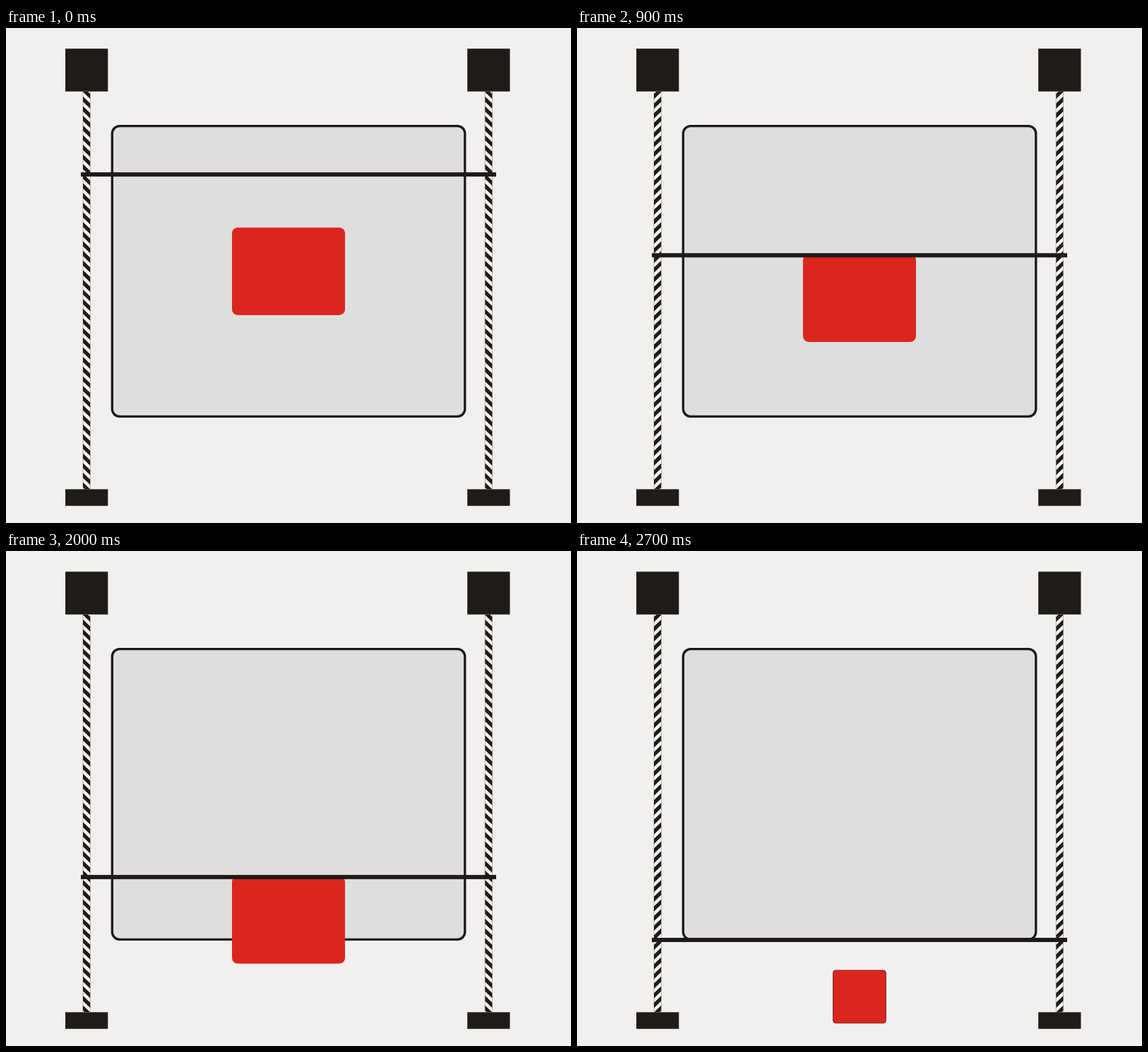
Recreate the animation shown at these times as an HTML page. Size 800 px wide and 700 px high, loop 2800 ms.

```html
<!DOCTYPE html>
<html lang="en">
<head>
<meta charset="utf-8">
<title>Pusher bar</title>
<style>
html, body { margin: 0; width: 100%; height: 100%; overflow: hidden; background: #f1f0ee; }
svg { display: block; width: 800px; height: 700px; }
</style>
</head>
<body>
<svg viewBox="0 0 800 700">
  <defs>
    <clipPath id="rod"><rect x="109" y="90" width="10.4" height="562"/></clipPath>
    <g id="screw">
      <g clip-path="url(#rod)">
        <rect x="109" y="90" width="10.4" height="562" fill="#faf9f7"/>
        <path id="thread" fill="#1f1b19"/>
      </g>
      <path d="M109.1 90V652M119.3 90V652" stroke="#1f1b19" stroke-width=".5" opacity=".6"/>
      <path d="M84 29.2h60.3v60.6H84zM84 652.2h60.3v23.6H84z" fill="#211b18"/>
    </g>
  </defs>
  <rect width="800" height="700" fill="#f1f0ee"/>
  <rect x="150.3" y="138.7" width="499.5" height="410.6" rx="10.5" fill="#dededc" stroke="#1d1919" stroke-width="3.3"/>
  <use href="#screw"/>
  <use href="#screw" x="569.2"/>
  <g fill="#db261d" stroke="#5e1712" stroke-width="0">
    <rect id="top"/>
    <rect id="back"/>
  </g>
  <rect id="bar" x="106" width="588" height="6" fill="#1f1a1a"/>
</svg>
<script>
const LOOP = 2800, STEP = 100, TIP = 2300, FALL = 2400;
const $ = id => document.getElementById(id);
const set = (el, attrs) => { for (const k in attrs) el.setAttribute(k, attrs[k]); };
const mix = (a, b, p) => a + (b - a) * p;

// Slanted bands across the rod; dir flips the slope
function thread(dir) {
  const pitch = 13.64, half = 3.7, rise = 5 * dir;
  let d = "";
  for (let y = 91.9 - pitch; y < 670; y += pitch) {
    d += `M109 ${y - rise - half}L119.4 ${y + rise - half}v${2 * half}L109 ${y - rise + half}z`;
  }
  return d;
}
const threads = [thread(1), thread(-1)];

function face(el, x, y, w, h, r, line) {
  set(el, { x, y, width: w, height: h, rx: r, "stroke-width": line });
}

function draw(time) {
  const step = Math.floor((time % LOOP) / STEP), t = step * STEP;
  const bar = 207.1 + 0.127 * t;
  set($("bar"), { y: bar - 3 });
  set($("thread"), { d: threads[step % 2] });

  if (t < TIP) {
    face($("top"), 320, Math.max(282.2, bar - 1.2), 160, 123.7, 8, 0);
    face($("back"), 320, 0, 0, 0, 0, 0);
  } else if (t < FALL) {
    // tipping over the edge: the back face comes into view
    face($("top"), 320.2, 502, 159.6, 107, 8, 0.8);
    face($("back"), 320.2, 502, 159.6, 58, 6, 0.8);
  } else {
    const p = (t - FALL) / (LOOP - STEP - FALL);
    const size = mix(159.6, 74.8, p), mid = mix(610, 630.3, p);
    face($("top"), 320, 0, 0, 0, 0, 0);
    face($("back"), 400 - size / 2, mid - size / 2, size, size, size / 20, 0.8);
  }
}

const start = performance.now();
function tick() {
  draw(performance.now() - start);
  requestAnimationFrame(tick);
}
draw(0);
requestAnimationFrame(tick);
</script>
</body>
</html>
```
